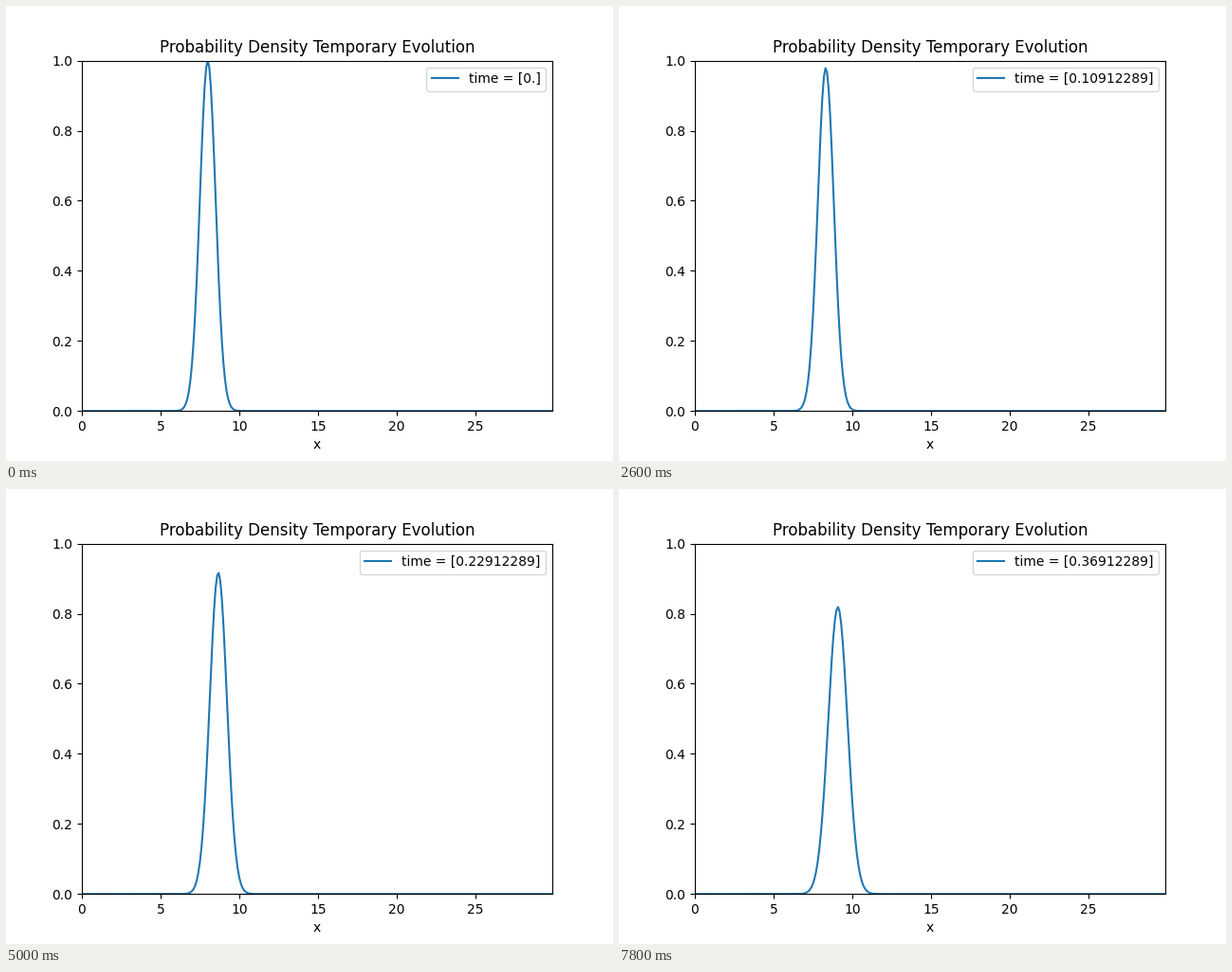
These frames come from a looping animation (640x480 px, 8 s). A matplotlib script:

```python
import numpy as np
import matplotlib.pyplot as plt
from matplotlib.animation import FuncAnimation

FRAMES, INTERVAL = 40, 200
DX, CENTER, K0 = 0.1, 8.0, 3.0
T_RAMP, DT = 0.00912289, 0.01

# Free particle on a grid: second-order finite differences, hard walls
x = np.arange(300) * DX
x = x[:-1] if x[-1] > 29.95 else x
n = len(x)
hop = np.full(n - 1, -0.5 / DX**2)
energy, modes = np.linalg.eigh(
    np.diag(np.full(n, 1 / DX**2)) + np.diag(hop, 1) + np.diag(hop, -1))
packet = np.exp(-(x - CENTER)**2 + 1j * K0 * x)
coeffs = modes.T @ packet


def time_at(i):
    """Adaptive start-up (each step ten times the last), then fixed steps."""
    if i < 4:
        return (0, 1, 11, 111)[i] * T_RAMP / 111
    return T_RAMP + (i - 3) * DT


def density(t):
    return np.abs(modes @ (np.exp(-1j * energy * t) * coeffs))**2


fig, ax = plt.subplots(figsize=(6.4, 4.8), dpi=100)
line, = ax.plot(x, density(0), label="time = [0.]")
ax.set_xlim(0, x[-1])
ax.set_ylim(0, 1)
ax.set_xlabel("x")
ax.set_title("Probability Density Temporary Evolution")
label = ax.legend(loc="upper right").get_texts()[0]


def update(i):
    t = time_at(i)
    line.set_ydata(density(t))
    label.set_text(f"time = {np.array([t], dtype=float)}")
    return line, label


anim = FuncAnimation(fig, update, frames=FRAMES, interval=INTERVAL,
                     repeat=True, repeat_delay=0, blit=False)
plt.show()
```
